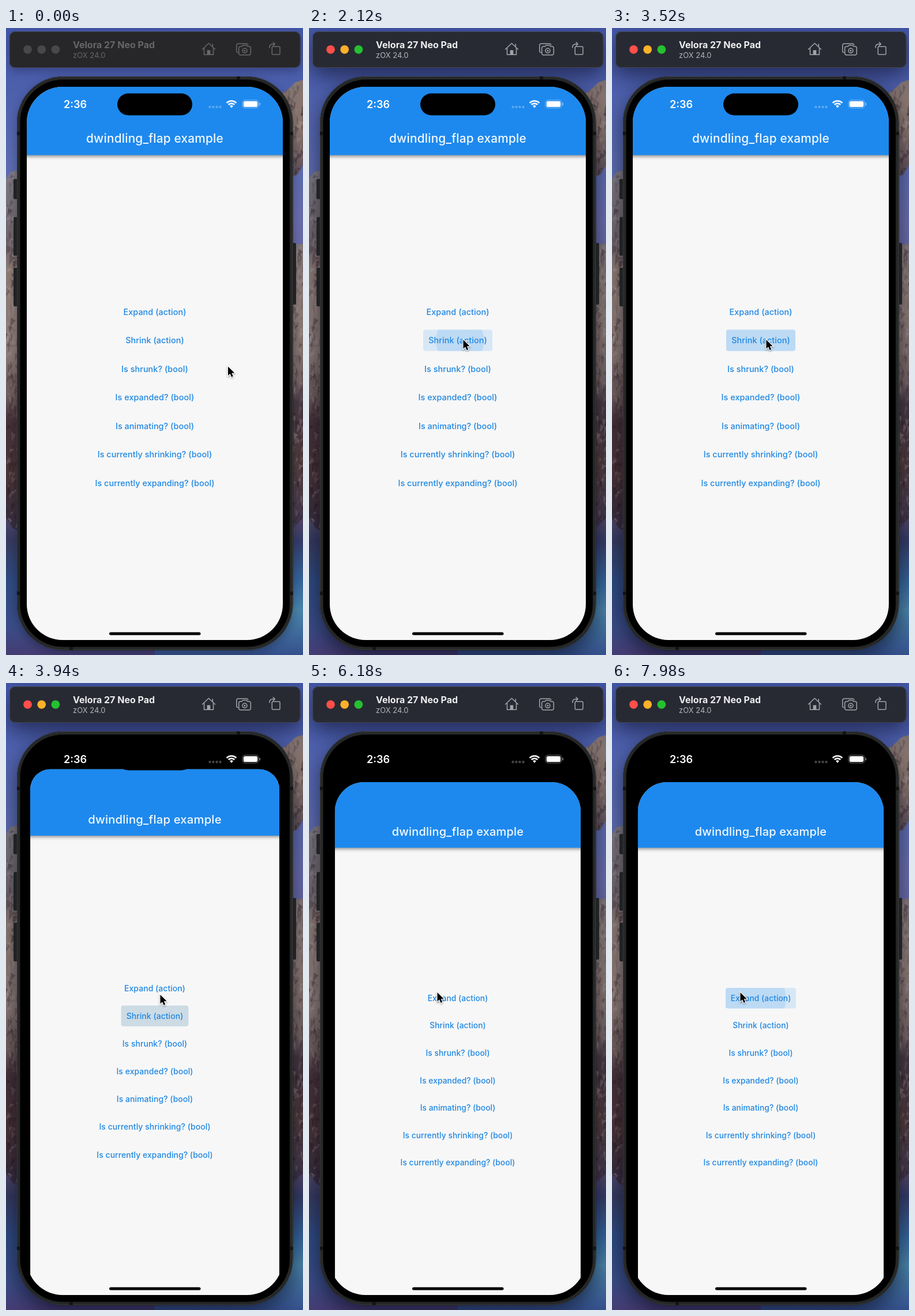
An HTML page with a canvas that plays this animation: 515 by 1088 pixels, repeating every 8000 ms.

```html
<!DOCTYPE html>
<html lang="en">
<head>
<meta charset="utf-8">
<title>Shrinking screen demo</title>
<style>
html, body { margin: 0; width: 100%; height: 100%; overflow: hidden; background: #000; }
canvas { display: block; width: 515px; height: 1088px; }
</style>
</head>
<body>
<canvas id="stage" width="515" height="1088"></canvas>
<script>
const W = 515, H = 1088, LOOP = 8000, CX = 258;
const ctx = document.getElementById('stage').getContext('2d');
const FONT = 'Inter, "Liberation Sans", sans-serif';
const ITEMS = ['Expand (action)', 'Shrink (action)', 'Is shrunk? (bool)', 'Is expanded? (bool)',
  'Is animating? (bool)', 'Is currently shrinking? (bool)', 'Is currently expanding? (bool)'];

// Timeline, ms
const ACTIVATE = 1100;
const MOVES = [[250, 950, 385, 587.5, 267.5, 541], [5350, 5900, 267.5, 541, 222.5, 537]];
const PRESSES = [
  { item: 1, down: 1540, up: 3850, x: 267, half: 60, reach: 72 },
  { item: 0, down: 7400, up: 9000, x: 220.5, half: 63.5, reach: 105 }
];
const SHRINK = [3805, 4005];

const clamp = v => Math.max(0, Math.min(1, v));
const mix = (a, b, p) => a + (b - a) * p;
const span = (t, a, b) => clamp((t - a) / (b - a));
const smooth = p => p * p * (3 - 2 * p);

function box(g, x, y, w, h, r, fill) {
  g.beginPath();
  g.roundRect(x, y, w, h, r);
  if (fill) { g.fillStyle = fill; g.fill(); }
}

function dot(g, x, y, r, fill) {
  g.beginPath();
  g.arc(x, y, r, 0, 7);
  g.fillStyle = fill;
  g.fill();
}

function label(g, str, x, y, size, weight, fill, align = 'left', gap = 0) {
  g.font = `${weight} ${size}px ${FONT}`;
  g.textAlign = align;
  g.letterSpacing = gap + 'px';
  g.fillStyle = fill;
  g.fillText(str, x, y);
}

function trace(g, pts) {
  g.beginPath();
  pts.forEach(([x, y], i) => i ? g.lineTo(x, y) : g.moveTo(x, y));
}

function fade(g, y0, y1, stops) {
  const f = g.createLinearGradient(0, y0, 0, y1);
  stops.forEach(([y, c]) => f.addColorStop((y - y0) / (y1 - y0), c));
  return f;
}

function layer(paint) {
  const c = document.createElement('canvas');
  c.width = W; c.height = H;
  paint(c.getContext('2d'));
  return c;
}

let seed = 11;
function rnd() {
  seed = (seed * 16807) % 2147483647;
  return seed / 2147483647;
}

function rock(g, x0, x1, outline, stops) {
  const top = stops[0][0], end = stops[stops.length - 1][0];
  g.save();
  trace(g, outline);
  g.clip();
  g.fillStyle = fade(g, top, end, stops);
  g.fillRect(x0, top - 10, x1 - x0, end - top + 20);
  for (let i = 0; i < (end - top) * 0.7; i++) {
    const x = mix(x0, x1, rnd()), y = mix(top, end, rnd()), l = 4 + rnd() * 16;
    g.fillStyle = rnd() < 0.6 ? `rgba(38,24,32,${0.1 + rnd() * 0.25})` : `rgba(190,178,180,${0.06 + rnd() * 0.2})`;
    trace(g, [[x, y], [x + 2 + rnd() * 6, y + l * 0.3], [x + rnd() * 6 - 3, y + l]]);
    g.fill();
  }
  g.restore();
}

function paintDesktop(g) {
  g.fillStyle = fade(g, 0, H, [[0, '#4356a6'], [110, '#4d60ac'], [240, '#5b6cb0'], [330, '#6a6dab'],
    [850, '#4d4668'], [890, '#353a5e'], [960, '#2e4a80'], [1040, '#3a4c86'], [1088, '#453c72']]);
  g.fillRect(0, 0, W, H);
  g.fillStyle = fade(g, 850, H, [[850, '#544666'], [890, '#343c66'], [960, '#35659a'], [1010, '#4a86aa'], [1088, '#35508c']]);
  g.fillRect(CX, 850, CX, H - 850);
  rock(g, 0, 40, [[0, 262], [8, 250], [22, 246], [40, 250], [40, 880], [12, 868], [0, 850]],
    [[246, '#7d7981'], [370, '#6e646a'], [420, '#8b7a73'], [560, '#8b7a75'], [640, '#6d5b58'],
      [680, '#463138'], [780, '#483335'], [880, '#332b40']]);
  rock(g, 470, W, [[470, 120], [492, 104], [502, 94], [515, 90], [515, 238], [505, 255], [470, 262]],
    [[90, '#82736f'], [170, '#8b776f'], [262, '#5a4d57']]);
  rock(g, 470, W, [[470, 380], [515, 374], [515, 850], [500, 866], [470, 870]],
    [[374, '#827576'], [500, '#8b7b75'], [610, '#756564'], [650, '#473842'], [760, '#513d3e'], [870, '#41374f']]);
}

function paintPhone(g) {
  for (const [y, h] of [[262, 35], [328, 67], [416, 67]]) box(g, 13, y, 8, h, 2, '#202224');
  box(g, 495, 373, 8, 107, 2, '#202224');
  box(g, 19, 84, 478.5, 995.5, 80, '#111313');
  g.strokeStyle = '#4a4b49';
  g.lineWidth = 1;
  box(g, 19.8, 84.8, 476.9, 993.9, 79);
  g.stroke();
  g.strokeStyle = '#292b2b';
  g.lineWidth = 3;
  box(g, 22.4, 87.4, 471.7, 988.7, 77);
  g.stroke();
  g.fillStyle = '#131414';
  for (const y of [180, 978]) { g.fillRect(19, y, 5, 6); g.fillRect(492.5, y, 5, 6); }
  g.fillRect(400, 84, 6, 5);
  g.fillRect(110, 1074, 6, 5);
  box(g, 25, 90, 466.5, 983.5, 74, '#000');
}

function paintIcons(g, ink) {
  g.strokeStyle = g.fillStyle = ink;
  g.lineWidth = 1.5;
  g.lineJoin = g.lineCap = 'round';
  // house
  trace(g, [[340.5, 37], [351.5, 26.5], [362.5, 37]]);
  g.stroke();
  trace(g, [[343.5, 35], [343.5, 46.3], [359.5, 46.3], [359.5, 35]]);
  g.stroke();
  trace(g, [[358.3, 32], [358.3, 28]]);
  g.stroke();
  g.fillRect(348.7, 38.5, 5.6, 8);
  // stacked cameras
  trace(g, [[402, 42.5], [400.5, 42], [399.8, 40.5], [399.8, 29], [401.5, 27.2], [418, 27.2], [419.8, 29]]);
  g.stroke();
  trace(g, [[405.5, 32], [409, 32], [411, 30], [417, 30], [419, 32], [422.5, 32], [424.3, 33.8],
    [424.3, 45], [422.5, 46.8], [405.5, 46.8], [403.7, 45], [403.7, 33.8]]);
  g.closePath();
  g.stroke();
  g.beginPath();
  g.arc(414, 39.3, 4, 0, 7);
  g.stroke();
  dot(g, 414, 39.3, 1.5, ink);
  // rotate
  box(g, 461.3, 32.3, 13.7, 13.7, 1.5);
  g.stroke();
  g.beginPath();
  g.moveTo(457, 34);
  g.bezierCurveTo(456.6, 29.5, 459, 27.6, 466, 27.8);
  g.moveTo(463.2, 24.8);
  g.lineTo(466.3, 27.8);
  g.lineTo(463.2, 30.8);
  g.stroke();
}

function paintToolbar(g, on) {
  g.save();
  g.shadowColor = `rgba(0,0,15,${on ? 0.5 : 0.25})`;
  g.shadowBlur = on ? 34 : 16;
  g.shadowOffsetY = on ? 14 : 6;
  box(g, 6, 6, 504.5, 63, 10, on ? '#282a33' : '#272729');
  g.restore();
  g.strokeStyle = on ? '#43454d' : '#3d3d3f';
  g.lineWidth = 1;
  box(g, 6.5, 6.5, 503.5, 62, 9.5);
  g.stroke();
  const lights = on ? ['#fe4f4a', '#fdb02a', '#25c131'] : ['#48484a', '#48484a', '#48484a'];
  lights.forEach((c, i) => dot(g, 37.5 + i * 24.2, 37.3, 7.4, c));
  label(g, 'Velora 27 Neo Pad', 116, 35.2, 16, 700, on ? '#eeeef0' : '#666668');
  label(g, 'zOX 24.0', 116, 51.8, 13, 400, on ? '#b4b5ba' : '#666668');
  paintIcons(g, on ? '#a3a4ab' : '#69696b');
}

function scene(on) {
  return layer(g => {
    paintDesktop(g);
    g.save();
    g.shadowColor = `rgba(0,0,15,${on ? 0.55 : 0.3})`;
    g.shadowBlur = on ? 36 : 18;
    g.shadowOffsetY = on ? 14 : 6;
    box(g, 19, 84, 478.5, 995.5, 80, '#111');
    g.restore();
    paintToolbar(g, on);
    paintPhone(g);
  });
}

function ink(p, t, y) {
  if (t < p.down || t > p.up + 220) return;
  const grow = span(t, p.down, p.down + 1000);
  const out = 1 - span(t, p.up + 60, p.up + 220);
  const grey = span(t, p.up, p.up + 70);
  const tint = a => `rgba(${mix(33, 60, grey)},${mix(140, 125, grey)},${mix(235, 165, grey)},${a * out})`;
  ctx.save();
  box(ctx, CX - p.half, y - 18.5, p.half * 2, 37, 4);
  ctx.clip();
  ctx.fillStyle = tint(0.15 * span(t, p.down, p.down + 200));
  ctx.fillRect(0, y - 20, W, 40);
  dot(ctx, mix(p.x, CX, grow), y, p.reach * grow, tint(0.15));
  ctx.restore();
}

function drawApp(t) {
  const p = span(t, ...SHRINK);
  const s = mix(1, 0.96, p);
  ctx.save();
  box(ctx, 36, 102, 444, 960, 62);
  ctx.clip();
  ctx.translate(CX, mix(102, 172, p));
  ctx.scale(s, s);
  ctx.translate(-CX, -102);
  box(ctx, 36, 102, 444, 960, 53 * p);
  ctx.clip();
  ctx.fillStyle = '#f7f7f7';
  ctx.fillRect(36, 102, 444, 960);
  ctx.save();
  ctx.shadowColor = 'rgba(0,0,0,0.45)';
  ctx.shadowBlur = 6;
  ctx.shadowOffsetY = 2;
  ctx.fillStyle = '#1d89ee';
  ctx.fillRect(30, 96, 456, 124.5);
  ctx.restore();
  label(ctx, 'dwindling_flap example', CX, 199.3, 20.8, 500, '#f4f8fc', 'center', 0.2);
  const rowY = i => 542 + (i - 1) * 49.5;
  PRESSES.forEach(q => ink(q, t, rowY(q.item)));
  ITEMS.forEach((s, i) => label(ctx, s, CX, rowY(i) + 5.3, 14.4, 500, '#1f87e3', 'center', 0.05));
  ctx.restore();
}

function drawStatus() {
  box(ctx, 193, 113.5, 130, 38, 19, '#000');
  label(ctx, '2:36', 120, 138.5, 18.1, 600, '#fff', 'center');
  for (let i = 0; i < 4; i++) dot(ctx, 353.5 + i * 6, 137, 2.2, 'rgba(255,255,255,0.27)');
  ctx.strokeStyle = '#fff';
  ctx.lineCap = 'butt';
  ctx.lineWidth = 2.7;
  for (const r of [7.4, 11.8]) {
    ctx.beginPath();
    ctx.arc(391, 138.3, r, -Math.PI * 0.75, -Math.PI * 0.25);
    ctx.stroke();
  }
  ctx.beginPath();
  ctx.moveTo(391, 138.8);
  ctx.arc(391, 138.3, 4, -Math.PI * 0.75, -Math.PI * 0.25);
  ctx.fillStyle = '#fff';
  ctx.fill();
  ctx.strokeStyle = 'rgba(255,255,255,0.45)';
  ctx.lineWidth = 1;
  box(ctx, 410, 125.2, 28, 13.6, 4.2);
  ctx.stroke();
  box(ctx, 411.8, 127, 24.4, 10, 2.8, '#fff');
  box(ctx, 439.3, 129.8, 1.7, 4.6, 0.8, 'rgba(255,255,255,0.5)');
  box(ctx, 179, 1048.5, 158.5, 5, 2.5, '#000');
}

function drawCursor(t) {
  let [, , x, y] = MOVES[0];
  for (const [a, b, x0, y0, x1, y1] of MOVES) {
    if (t < a) break;
    const p = smooth(span(t, a, b));
    x = mix(x0, x1, p);
    y = mix(y0, y1, p);
  }
  ctx.save();
  ctx.translate(x, y);
  ctx.scale(0.93, 0.93);
  trace(ctx, [[0, 0], [0, 16.8], [3.8, 13.2], [6.5, 19.3], [9.4, 18], [6.8, 12.1], [12, 11.7]]);
  ctx.closePath();
  ctx.lineJoin = 'miter';
  ctx.strokeStyle = '#fff';
  ctx.lineWidth = 2.4;
  ctx.shadowColor = 'rgba(0,0,0,0.35)';
  ctx.shadowBlur = 3;
  ctx.shadowOffsetY = 1.5;
  ctx.stroke();
  ctx.shadowColor = 'transparent';
  ctx.fillStyle = '#000';
  ctx.fill();
  ctx.restore();
}

const idle = scene(false);
seed = 11;
const active = scene(true);
const start = performance.now();

function frame() {
  const t = (performance.now() - start) % LOOP;
  ctx.drawImage(t < ACTIVATE ? idle : active, 0, 0);
  drawApp(t);
  drawStatus();
  drawCursor(t);
  requestAnimationFrame(frame);
}
frame();
</script>
</body>
</html>
```
